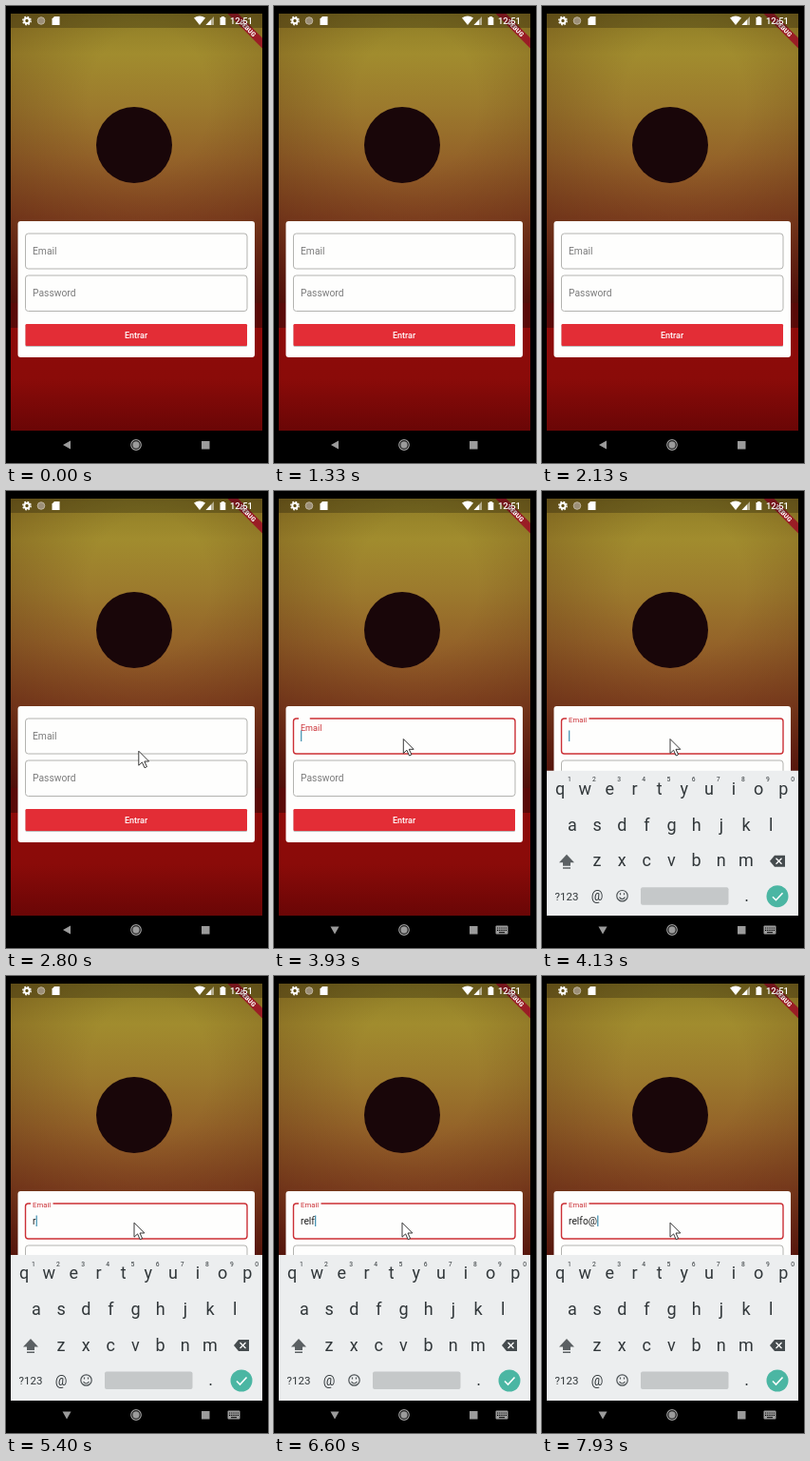
Recreate the animation shown at these times as an HTML page. Size 276x480 px, loop 8000 ms.

```html
<!DOCTYPE html>
<html lang="pt">
<head>
<meta charset="utf-8">
<title>Login</title>
<style>
html, body { margin: 0; width: 100%; height: 100%; overflow: hidden; background: #000; }
svg { display: block; width: 276px; height: 480px; font-family: Roboto, sans-serif; }
.mid { text-anchor: middle; }
</style>
</head>
<body>
<svg viewBox="0 0 276 480">
  <defs>
    <linearGradient id="wall" x2="0" y2="1">
      <stop offset="0" stop-color="#8f7d26"/>
      <stop offset=".14" stop-color="#a18c2e"/>
      <stop offset=".32" stop-color="#9c7a2d"/>
      <stop offset=".5" stop-color="#946329"/>
      <stop offset=".72" stop-color="#814120"/>
      <stop offset="1" stop-color="#5c150d"/>
    </linearGradient>
    <linearGradient id="floor" x2="0" y2="1">
      <stop offset="0" stop-color="#8e0b09"/>
      <stop offset=".5" stop-color="#8a0b09"/>
      <stop offset="1" stop-color="#6a0606"/>
    </linearGradient>
    <radialGradient id="shade" cx=".55" cy=".3" r=".8">
      <stop offset=".3" stop-color="#300" stop-opacity="0"/>
      <stop offset="1" stop-color="#300" stop-opacity=".28"/>
    </radialGradient>
    <clipPath id="screen"><path d="M5 8H270V446H5z"/></clipPath>
  </defs>

  <g clip-path="url(#screen)">
    <!-- backdrop -->
    <path fill="url(#wall)" d="M5 8H270V312H5z"/>
    <path fill="url(#shade)" d="M5 8H270V312H5z"/>
    <path fill="#5a0a08" d="M5 312H270V338H5z"/>
    <path fill="url(#floor)" d="M5 338H270V446H5z"/>
    <circle cx="135" cy="146" r="40" fill="#190609"/>

    <g transform="translate(270 8) rotate(45)">
      <path fill="#9a1d25" d="M-26 18H26V25.8H-26z"/>
      <text class="mid" y="24.2" font-size="6.6" font-weight="900" fill="#fff">DEBUG</text>
    </g>

    <!-- status bar -->
    <path opacity=".25" d="M5 8H270V23H5z"/>
    <g fill="#fff">
      <circle cx="22" cy="15.5" r="2.7" fill="none" stroke="#fff" stroke-width="2"/>
      <circle cx="22" cy="15.5" r="4.2" fill="none" stroke="#fff" stroke-width="1.4" stroke-dasharray="1.7 1.6"/>
      <circle cx="37" cy="15.5" r="3.8" fill="#9c8f78" stroke="#c9c0ad" stroke-width=".8"/>
      <path d="M51 11H56.500V20H48.500V13.500z"/>
      <path d="M198 12.500Q204 8.500 210 12.500L204 20z"/>
      <path opacity=".5" d="M219 11V20H210.500z"/>
      <path d="M216 14.200V20H210.500z"/>
      <path d="M225.500 12H227V11H230V12H231.300V20H225.500z"/>
      <text x="236" y="19" font-size="9.4" font-weight="500">12:51</text>
    </g>

    <!-- form -->
    <rect x="12.500" y="226" width="249.500" height="143" rx="3" fill="#fefefd"/>
    <path id="email" fill="none"/>
    <rect x="20.500" y="283" width="233.500" height="37.500" rx="3" fill="none" stroke="#b3b3b0"/>
    <text id="label" x="28">Email</text>
    <text id="typed" x="28" y="261" font-size="10.32" fill="#222"></text>
    <path id="caret" stroke="#3c8fb0" stroke-width="1.2"/>
    <text x="28" y="305.300" font-size="10.32" fill="#7b7b7b">Password</text>
    <rect x="20.500" y="335" width="233.500" height="23" rx="1.300" opacity=".25"/>
    <rect x="20.500" y="334" width="233.500" height="23" rx="1.300" fill="#e32d36"/>
    <text class="mid" x="137" y="349" font-size="9.03" font-weight="500" fill="#fff">Entrar</text>

    <!-- on-screen keyboard -->
    <g id="keyboard">
      <path fill="#eceeef" d="M5 293H270V446H5z"/>
      <g id="keys" class="mid" fill="#31373a"></g>
      <path fill="#5b6063" d="M26 381L34 389.500H30V393H22V389.500H18zM22 394.500H30V396H22z"/>
      <path fill="#454b4e" d="M240 388L245 382H256V394H245z"/>
      <path stroke="#fff" stroke-width="1.300" d="M246.500 385L252.500 391M252.500 385L246.500 391"/>
      <g fill="none" stroke="#4d5356" stroke-width="1.200">
        <circle cx="84.500" cy="424.500" r="5.700"/>
        <path d="M81.500 426Q84.500 430 87.500 426M82.500 421.500V423.500M86.500 421.500V423.500"/>
      </g>
      <rect x="104" y="415.500" width="92.500" height="18.500" rx="2" fill="#c5c8c9"/>
      <circle cx="248" cy="425" r="11.500" fill="#4bb6a3"/>
      <path fill="none" stroke="#fff" stroke-width="1.600" d="M243 425.500L246.500 429L253.500 421.500"/>
    </g>
  </g>

  <!-- navigation bar -->
  <g fill="#9b9b9b">
    <path id="back"/>
    <circle cx="137" cy="461" r="5.300" fill="none" stroke="#9b9b9b" stroke-width="1.200"/>
    <circle cx="137" cy="461" r="3.700"/>
    <path d="M206 457H214.500V465.500H206z"/>
    <g id="switcher">
      <rect x="233.500" y="456.500" width="13" height="9" rx="1"/>
      <path stroke="#000" stroke-width="1.200" stroke-dasharray="1.200 1" d="M235 459H245.500M235 461.300H245.500"/>
      <path stroke="#000" d="M237 463.700H243"/>
    </g>
  </g>

  <path id="pointer" fill="#fff" stroke="#222" stroke-width=".9" stroke-linejoin="round"
    d="M0 0V15L3.600 11.700L6.200 17.500L8.600 16.400L6 10.800H10.800z"/>
</svg>

<script>
const $ = id => document.getElementById(id);
const set = (id, attrs) => {
  for (const name in attrs) $(id).setAttribute(name, attrs[name]);
};
const mix = (a, b, p) => a + (b - a) * p;
const ramp = (t, start, length) => Math.min(1, Math.max(0, (t - start) / length));

const LOOP = 8000, FOCUS = 3830, KEYBOARD = 3930;
const WORD = "relfo@";
const KEY_TIMES = [5330, 5730, 6000, 6400, 6730, 7530];
// time, x, y
const PATH = [[2330, 276, 300], [2800, 139.8, 273.2], [3200, 137.5, 262],
  [3930, 136.3, 260.5], [4130, 135, 260.5], [4530, 135, 259.2]];

function addKey(text, x, y, size) {
  const key = document.createElementNS("http://www.w3.org/2000/svg", "text");
  key.textContent = text;
  for (const [name, value] of Object.entries({ x, y, "font-size": size }))
    key.setAttribute(name, value);
  $("keys").append(key);
}
[["qwertyuiop", 19, 318], ["asdfghjkl", 32, 356], ["zxcvbnm", 58, 393.5]]
  .forEach(([row, x, y]) => [...row].forEach((c, i) => addKey(c, x + 26.15 * i, y, 18)));
[..."1234567890"].forEach((c, i) => addKey(c, 28.8 + 26.15 * i, 304.5, 6.8));
addKey("?123", 26, 429, 11.5);
addKey("@", 58, 429.5, 14);
addKey(".", 215.5, 430, 18);

function movePointer(t) {
  const next = PATH.findIndex(point => point[0] > t);
  const end = PATH.at(next);
  const start = next > 0 ? PATH[next - 1] : end;
  const p = next > 0 ? ramp(t, start[0], end[0] - start[0]) : 1;
  set("pointer", {
    transform: `translate(${mix(start[1], end[1], p)} ${mix(start[2], end[2], p)})`,
    visibility: t < PATH[0][0] ? "hidden" : "visible"
  });
}

function draw(t) {
  const focus = ramp(t, FOCUS, 200);
  const active = focus > 0;
  set("email", {
    d: `M${26 + 23.5 * focus} 239H251q3 0 3 3v31q0 3-3 3H23.500q-3 0-3-3v-31q0-3 3-3H26`,
    stroke: active ? "#cb3036" : "#b3b3b0",
    "stroke-width": active ? 1.4 : 1
  });
  set("label", {
    y: mix(261, 242.6, focus),
    "font-size": mix(10.32, 7.74, focus),
    fill: active ? "#cb3036" : "#7b7b7b"
  });

  const count = KEY_TIMES.filter(k => k <= t).length;
  $("typed").textContent = WORD.slice(0, count);
  const x = 28.7 + (count ? $("typed").getComputedTextLength() : 0);
  const lastInput = count ? KEY_TIMES[count - 1] : FOCUS;
  const lit = active && (t - lastInput) % 1000 < 500;
  set("caret", { d: `M${x} 251.500V263`, visibility: lit ? "visible" : "hidden" });

  const rise = ramp(t, KEYBOARD, 240);
  set("keyboard", {
    transform: `translate(0 ${153 * (1 - rise) ** 3})`,
    opacity: Math.min(1, rise * 2.5)
  });
  const open = t >= KEYBOARD;
  set("back", { d: open ? "M59.500 457.500H68.500L64 465.500z" : "M68 456.500V465.500L60 461z" });
  set("switcher", { visibility: open ? "visible" : "hidden" });
  movePointer(t);
}

function tick() {
  const t = performance.now() % LOOP;
  // the screen refreshes in alternating steps of 130 and 70 ms
  const step = t % 200;
  draw(t - step + (step < 130 ? 0 : 130));
  requestAnimationFrame(tick);
}
tick();
</script>
</body>
</html>
```
